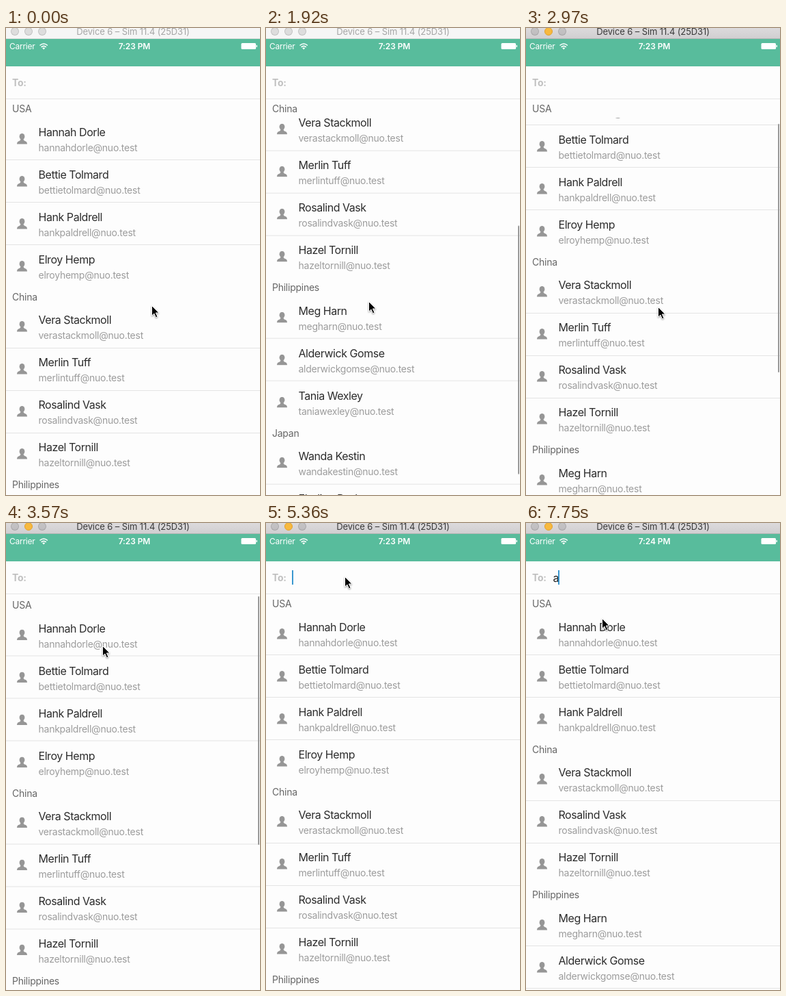
Write an HTML page that moves like this. It is 372 by 682 pixels and loops after 8 s.

```html
<!DOCTYPE html>
<html lang="en">
<head>
<meta charset="utf-8">
<title>Contact picker</title>
<style>
@property --y { syntax: '<length>'; inherits: true; initial-value: 0px; }

html, body { margin: 0; width: 100%; height: 100%; overflow: hidden; }
body { position: relative; background: #fdfdfd; font: 14px/20px Inter, Roboto, sans-serif; letter-spacing: -.25px; }
body * { position: absolute; box-sizing: border-box; white-space: nowrap; }
.anim { animation: 8s linear infinite paused; }
.step { animation-timing-function: step-end; }

/* window title */
.bar { inset: 0 0 auto; height: 16px; overflow: hidden; background: #f6f6f6; color: #a6a6a6; border-bottom: 1px solid #dcdcdc; animation-name: focus; }
.bar b { inset: -5px 0 auto; text-align: center; font-weight: 400; font-size: 13px; letter-spacing: -.1px; }
.bar i { top: -1px; width: 12px; height: 12px; border-radius: 50%; background: #0000001a; border: 1px solid #00000020; }
.bar .min { animation-name: light; }

/* status and field */
.nav { inset: 16px 0 auto; height: 40px; background: #58bc9c; color: #fff; font-size: 12px; }
.nav span { top: 1px; }
.clock { left: 0; width: 376px; text-align: center; font-weight: 600; letter-spacing: -.1px; }
.early { animation-name: hide; }
.late { animation-name: show; }
.nav svg { left: 0; top: -1px; }
.field { inset: 56px 0 auto; height: 48px; border-bottom: 1px solid #e6e6e6; }
.field b { left: 9px; top: 14px; font-weight: 700; color: #c0c0c0; }
.typed { left: 39.5px; top: 14px; font-size: 16px; color: #222; animation-name: typed; }
.caret { left: 38px; top: 13px; width: 2px; height: 21px; background: #3a97cf; opacity: 0; animation-name: blink, jump; animation-duration: 8s, 8s; animation-timing-function: linear, step-end; }

/* list */
.view { inset: 104px 0 0; overflow: hidden; animation-name: scroll; }
.list { inset: 0 0 auto; height: 1000px; transform: translateY(calc(-1 * var(--y))); }
.all { animation-name: untyped; }
.found { animation-name: typed; }
.head { left: 0; width: 100%; height: 26.5px; padding-left: 9px; line-height: 27px; color: #666; background: #fdfdfd; z-index: 1;
  transform: translateY(clamp(0px, var(--y) - var(--top), var(--room))); }
.row { left: 0; width: 100%; height: 62px; margin-top: .5px; }
.line { border-bottom: 1px solid #e4e4e4; }
.row b { left: 47.5px; top: 10.5px; font-weight: 400; font-size: 16px; letter-spacing: -.45px; color: #2c2c2c; }
.row span { left: 47.5px; top: 33.5px; color: #9c9c9c; }
.row svg { left: 15.5px; top: 22.5px; fill: #969696; }
.thumb { right: 1px; top: 3.5px; width: 2px; height: 363px; border-radius: 1px; background: #999; opacity: 0; z-index: 2;
  transform: translateY(calc(var(--y) * .6265)); animation-name: thumb; }

.mouse { left: .5px; top: .5px; overflow: visible; filter: drop-shadow(0 1px 1px #0006); animation-name: mouse; }

@keyframes focus {
  29.7%, to { background: linear-gradient(#dcdadc, #d1cfd1); color: #3a3a3a; border-color: #b6b6b6; }
}
@keyframes light { 29.7%, to { background: #f7b93e; border-color: #e0a030; } }
@keyframes hide { 0% { visibility: visible; } 89.3%, to { visibility: hidden; } }
@keyframes show { 0% { visibility: hidden; } 89.3%, to { visibility: visible; } }
@keyframes untyped { 0% { visibility: visible; } 81.9%, to { visibility: hidden; } }
@keyframes typed { 0% { visibility: hidden; } 81.9%, to { visibility: visible; } }
@keyframes jump { 0% { transform: none; } 81.9%, to { transform: translateX(9px); } }
@keyframes blink {
  0%, 55.7% { opacity: 0; }
  55.8%, 57.74% { opacity: 1; }
  61.46%, 63.3% { opacity: 0; }
  67.05%, 70.8% { opacity: 1; }
  74.5%, 76.4% { opacity: 0; }
  80.1%, 87.5% { opacity: 1; }
  91.2%, 93.1% { opacity: 0; }
  96.8%, to { opacity: 1; }
}
@keyframes scroll {
  0%, 13.04% { --y: 0px; }
  14.9% { --y: 8px; }
  16.76% { --y: 39.3px; }
  18.6% { --y: 130px; }
  20.5% { --y: 215px; }
  22.35% { --y: 262px; }
  24.21% { --y: 288.3px; }
  27.9%, 29.8% { --y: 304px; }
  31.66% { --y: 270px; }
  33.5% { --y: 200px; }
  35.4% { --y: 115px; }
  37.25% { --y: 51px; }
  39.1% { --y: 5px; }
  41% { --y: -12px; }
  42.8% { --y: -5px; }
  44.7% { --y: -1.5px; }
  46.6%, to { --y: 0px; }
}
@keyframes thumb {
  0%, 13.04% { opacity: 0; }
  14.9%, 46.6% { opacity: 1; }
  50.2%, to { opacity: 0; }
}
@keyframes mouse {
  0% { transform: translate(212px, 404px); }
  1.86% { transform: translate(215px, 402px); }
  7.45%, 9.3% { transform: translate(186px, 399px); }
  16.76% { transform: translate(183px, 309px); animation-timing-function: ease-out; }
  20.5% { transform: translate(165px, 190px); animation-timing-function: ease-in-out; }
  24.21% { transform: translate(149px, 398px); animation-timing-function: ease-in-out; }
  29.8% { transform: translate(172px, 190px); }
  37.25% { transform: translate(192px, 406px); }
  44.7% { transform: translate(140px, 178px); animation-timing-function: ease-out; }
  50.2%, 54% { transform: translate(114px, 79px); }
  55.8%, 70.8% { transform: translate(114px, 77px); }
  78.2%, to { transform: translate(110px, 138px); }
}
</style>
</head>
<body>
<div class="bar anim step">
  <i style="left:7px"></i><i class="min anim step" style="left:27px"></i><i style="left:47px"></i>
  <b>Device 6 – Sim 11.4 (25D31)</b>
</div>

<div class="nav">
  <span style="left:5px">Carrier</span>
  <span class="clock early anim step">7:23 PM</span>
  <span class="clock late anim step">7:24 PM</span>
  <svg width="372" height="24" fill="none" stroke="#fff">
    <path d="M49.5 10.5q5.7-5 11.4 0M51.6 12.8q3.6-3 7.2 0" stroke-width="1.6"/>
    <path d="M55.2 16.5l-2-2.2q2-1.5 4 0z" fill="#fff" stroke="none"/>
    <rect x="344.5" y="7" width="21.5" height="9" rx="1.5" fill="#fff" stroke="none"/>
    <path d="M367.2 10v3" stroke-width="1.4"/>
  </svg>
</div>

<div class="field">
  <b>To:</b>
  <span class="typed anim step">a</span>
  <div class="caret anim"></div>
</div>

<div class="view anim">
  <div class="list all anim step"></div>
  <div class="list found anim step"></div>
  <div class="thumb anim"></div>
</div>

<svg class="mouse anim" width="12" height="19">
  <path d="M.5.5V15.2L3.9 12 6.5 17.8 9 16.7 6.4 11H11z" fill="#000" stroke="#fff"/>
</svg>

<script>
const groups = {
  USA: ['Hannah Dorle', 'Bettie Tolmard', 'Hank Paldrell', 'Elroy Hemp'],
  China: ['Vera Stackmoll', 'Merlin Tuff', 'Rosalind Vask', 'Hazel Tornill'],
  Philippines: ['Meg Harn', 'Alderwick Gomse', 'Tania Wexley'],
  Japan: ['Wanda Kestin', 'Elodine Raske']
};
const HEAD = 26.5, ROW = 62;
const icon = `<svg width="15" height="16"><ellipse cx="7.5" cy="4.6" rx="3.9" ry="4.6"/>
  <path d="M0 15.5Q0 12 3 11.2 5.6 10.5 5.5 8h4Q9.4 10.5 12 11.2 15 12 15 15.5z"/></svg>`;

const row = (name, top, last) => `<div class="row ${last ? '' : 'line'}" style="top:${top}px">${icon}
  <b>${name}</b><span>${name.toLowerCase().replace(' ', '')}@nuo.test</span></div>`;

function fill(selector, keep) {
  let top = 0, html = '';
  for (const [title, people] of Object.entries(groups)) {
    const names = people.filter(keep);
    const room = names.length * ROW;
    html += `<div class="head" style="top:${top}px;--top:${top}px;--room:${room}px">${title}</div>`;
    names.forEach((name, i) => html += row(name, top + HEAD + i * ROW, i === names.length - 1));
    top += HEAD + room;
  }
  document.querySelector(selector).innerHTML = html;
}
fill('.all', () => true);
fill('.found', name => /a/i.test(name));

const LOOP = 8000, TICK = 149, LEAD = 25;
const anims = document.getAnimations();
const start = performance.now();
function draw() {
  const t = (performance.now() - start) % LOOP;
  const held = Math.min(Math.floor((t + LEAD) / TICK) * TICK, LOOP - 1);
  for (const a of anims) a.currentTime = held;
  requestAnimationFrame(draw);
}
draw();
</script>
</body>
</html>
```
